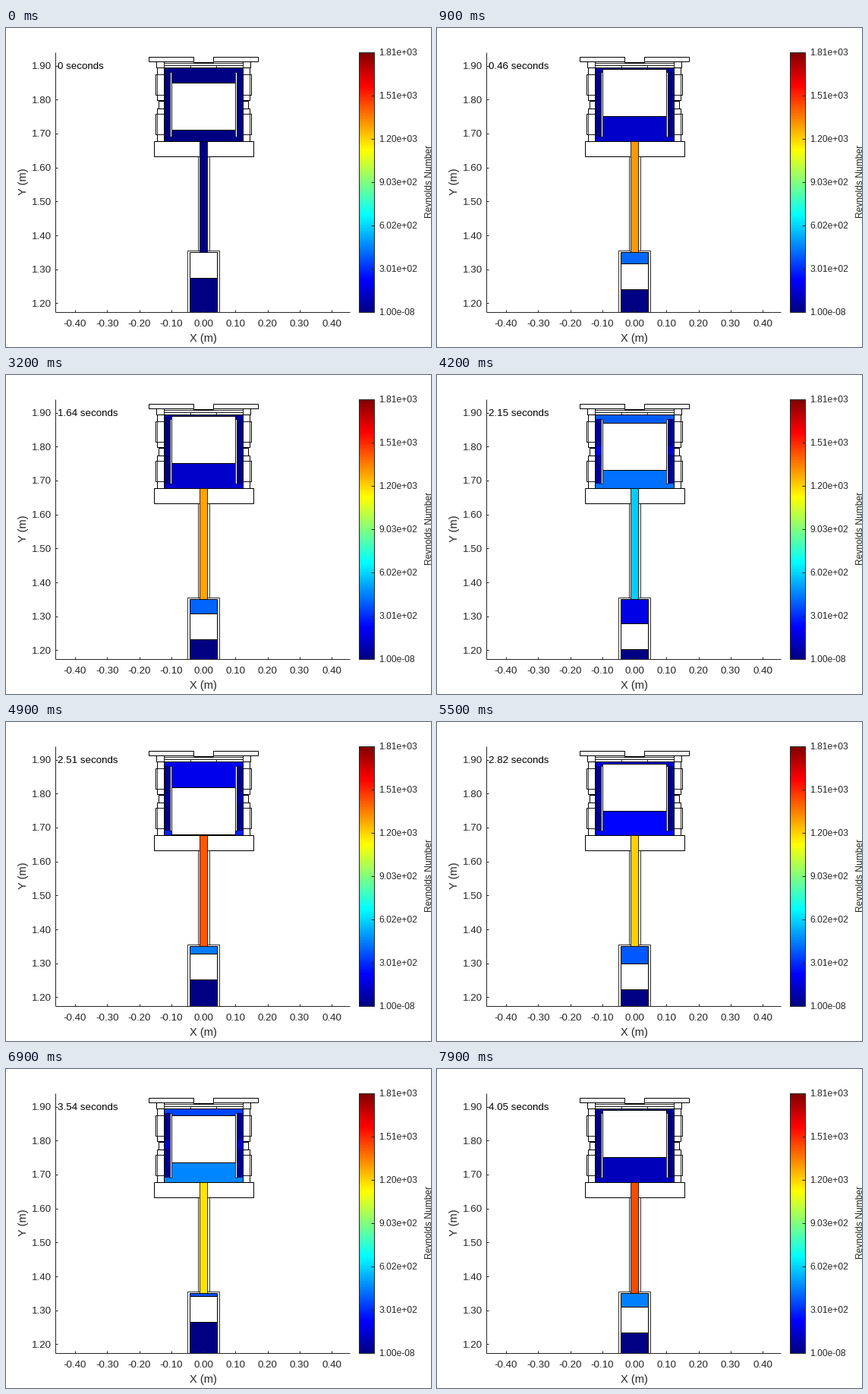
Animation of 560 by 420 pixels, one loop 8000 ms. Source, as a matplotlib script:

```python
import numpy as np
import matplotlib.pyplot as plt
from matplotlib.animation import FuncAnimation
from matplotlib.patches import Rectangle

W, H, DPI = 560, 420, 100
FRAMES, INTERVAL = 80, 100
STEP = np.radians(30.72)      # crank angle per frame
DT = 4.05 / 79                # simulated seconds per frame
RE_MAX = 1810
LEVELS = 256
MID = 260.5                   # symmetry axis of the engine
INK = "#262626"

plt.rcParams["font.family"] = "Liberation Sans"
fig = plt.figure(figsize=(W / DPI, H / DPI), dpi=DPI, facecolor="white")
ax = fig.add_axes([0, 0, 1, 1])
ax.axis("off")


def set_stage():
    """Half-pixel offset so lines given at pixel centres snap to that pixel."""
    ax.set_xlim(0.5, W + 0.5)
    ax.set_ylim(H - 0.5, -0.5)


def jet(level):
    """Jet colour for level 0..255."""
    def ramp(j):
        return float(np.clip(min(j, 192 - j) / 64, 0, 1))
    i = level + 1
    return ramp(i - 96), ramp(i - 32), ramp(i + 32)


def re_color(re):
    return jet(int(np.clip(re / RE_MAX * LEVELS, 0, LEVELS - 1)))


def px(size):
    return size * 72 / DPI


def box(x0, y0, x1, y1, face="white", edge="black", lw=1.0, z=2):
    patch = Rectangle((x0, y0), x1 - x0, y1 - y0, facecolor=face,
                      edgecolor=edge, linewidth=px(lw), zorder=z)
    return ax.add_patch(patch)


def pair(x0, y0, x1, y1, **kw):
    """A box and its mirror image; returns both."""
    return [box(x0, y0, x1, y1, **kw),
            box(2 * MID - x1, y0, 2 * MID - x0, y1, **kw)]


def line(xs, ys, z=5):
    ax.plot(xs, ys, color=INK, lw=px(1), zorder=z, solid_capstyle="butt")


def label(x, y, s, size=13.33, ha="center", color=INK, **kw):
    kw.setdefault("va", "baseline")
    return ax.text(x, y - 0.5, s, fontsize=px(size), ha=ha, color=color,
                   zorder=6, **kw)


def draw_axes():
    line([65.5, 65.5], [32, 374])
    line([65, 453], [373.5, 373.5])
    for k in range(8):
        y = 362 - k * 44.7
        line([65.5, 68.5], [y, y])
        label(60.5, y + 5, f"{1.2 + k / 10:.2f}", ha="right")
    for k in range(-4, 5):
        x = 260.5 + k * 42.25
        line([x, x], [370.5, 373.5])
        label(x, 393, f"{k / 10:.2f}")
    label(260.5, 413, "X (m)", 14.67)
    label(23, 202, "Y (m)", 14.67, va="center", rotation=90)


def draw_colorbar():
    top, bottom = 31.5, 373.5
    strip = np.array([[jet(i)] for i in range(LEVELS - 1, -1, -1)])
    ax.imshow(strip, extent=(465.5, 485.5, bottom, top), aspect="auto",
              interpolation="nearest", zorder=2)
    box(465.5, top, 485.5, bottom, face="none", edge=INK, z=4)
    names = ["1.00e-08", "3.01e+02", "6.02e+02", "9.03e+02",
             "1.20e+03", "1.51e+03", "1.81e+03"]
    for k, name in enumerate(names):
        y = bottom - k * (bottom - top) / 6
        line([481.5, 485.5], [y, y])
        label(491.5, y + 4.5, name, 12, ha="left")
    label(559, 202, "Reynolds Number", 12, va="center", rotation=90)


def draw_housing():
    pair(188.5, 37.5, 247.5, 43.5)
    box(247.5, 44.5, 273.5, 45.5)
    pair(198.5, 43.5, 208.5, 51.5)
    box(208.5, 45.5, 312.5, 48.5, lw=0.8)
    box(208.5, 48.5, 312.5, 51.5, lw=0.8)
    box(243.5, 48.5, 277.5, 51.5, lw=0.8)
    for top in (51.5, 105.5):
        pair(199.5, top, 208.5, top + 43)
    for top in (60.5, 112.5):
        pair(197.5, top, 208.5, top + 27)
        pair(199.5, top, 208.5, top + 27, lw=0.8)
    pair(201.5, 95.5, 208.5, 105.5)
    box(195.5, 148.5, 326.5, 168.5)
    box(253.5, 168.5, 268.5, 293.5, lw=0.8)
    box(239.5, 292.5, 281.5, 373.5, lw=0.8)


draw_axes()
draw_colorbar()
draw_housing()
set_stage()

navy = jet(0)
bottom_wide = box(208.5, 142.5, 312.5, 148.5, edge="none", z=3)
bottom_gas = box(218.5, 130, 302.5, 148.5, edge="none", z=3)
top_wide = box(208.5, 51.5, 312.5, 57.5, edge="none", z=3)
top_gas = box(218.5, 51.5, 302.5, 60, edge="none", z=3)
columns = pair(208.5, 57.5, 217.5, 142.5, face=navy, edge="none", z=3)
matrix = pair(208.5, 93.5, 217.5, 104.5, edge="none", z=3.1)
displacer = box(218.5, 60, 302.5, 122, z=4)
pair(216.5, 57.5, 218.5, 142.5, lw=0.8, z=4.1)
box(208.5, 51.5, 312.5, 148.5, face="none", z=4.2)
tube = box(255.5, 148.5, 265.5, 294.5, lw=0.8, z=4.3)
cylinder = box(242.5, 294.5, 278.5, 373.5, z=3)
crankcase = box(242.5, 329, 278.5, 373.5, face=navy, z=3.1)
piston = box(242.5, 295, 278.5, 329, z=4)
clock = label(69, 54, "", ha="left", color="black")


def span(patch, y0, y1):
    patch.set_y(y0)
    patch.set_height(max(y1 - y0, 0))


def update(n):
    phase = -STEP * n
    s, c = np.sin(phase), np.cos(phase)

    d = 72 - 17 * s - 2 * s * s
    span(displacer, d, d + 62)
    span(top_gas, 51.5, d)
    span(bottom_gas, d + 62, 148.5)
    p = 294.9 + 17 * (1 - c)
    span(piston, p, p + 34)
    span(cylinder, 294.5, max(p, 294.6))
    span(crankcase, p + 34, 373.5)

    # The engine is at rest on the very first step.
    moving = n > 0
    flow = abs(s) * (1252 + 370 * c + 150 * c * c + 2.8 * n)
    cold = moving * (75 + 460 * abs(c) * (1 + 0.15 * c))
    hot = moving * 450 * abs(c)
    tube.set_facecolor(re_color(flow))
    cylinder.set_facecolor(re_color(0.31 * flow))
    for patch in (bottom_gas, bottom_wide):
        patch.set_facecolor(re_color(cold))
    for patch in (top_gas, top_wide):
        patch.set_facecolor(re_color(hot))
    for patch in columns:
        patch.set_facecolor(re_color(0.1 * hot))
    for patch in matrix:
        patch.set_facecolor(re_color(0.4 * hot))

    clock.set_text(f"{round(n * DT, 2):g} seconds")
    return []


anim = FuncAnimation(fig, update, frames=FRAMES, interval=INTERVAL,
                     repeat=True, repeat_delay=0, blit=False)
plt.show()
```
